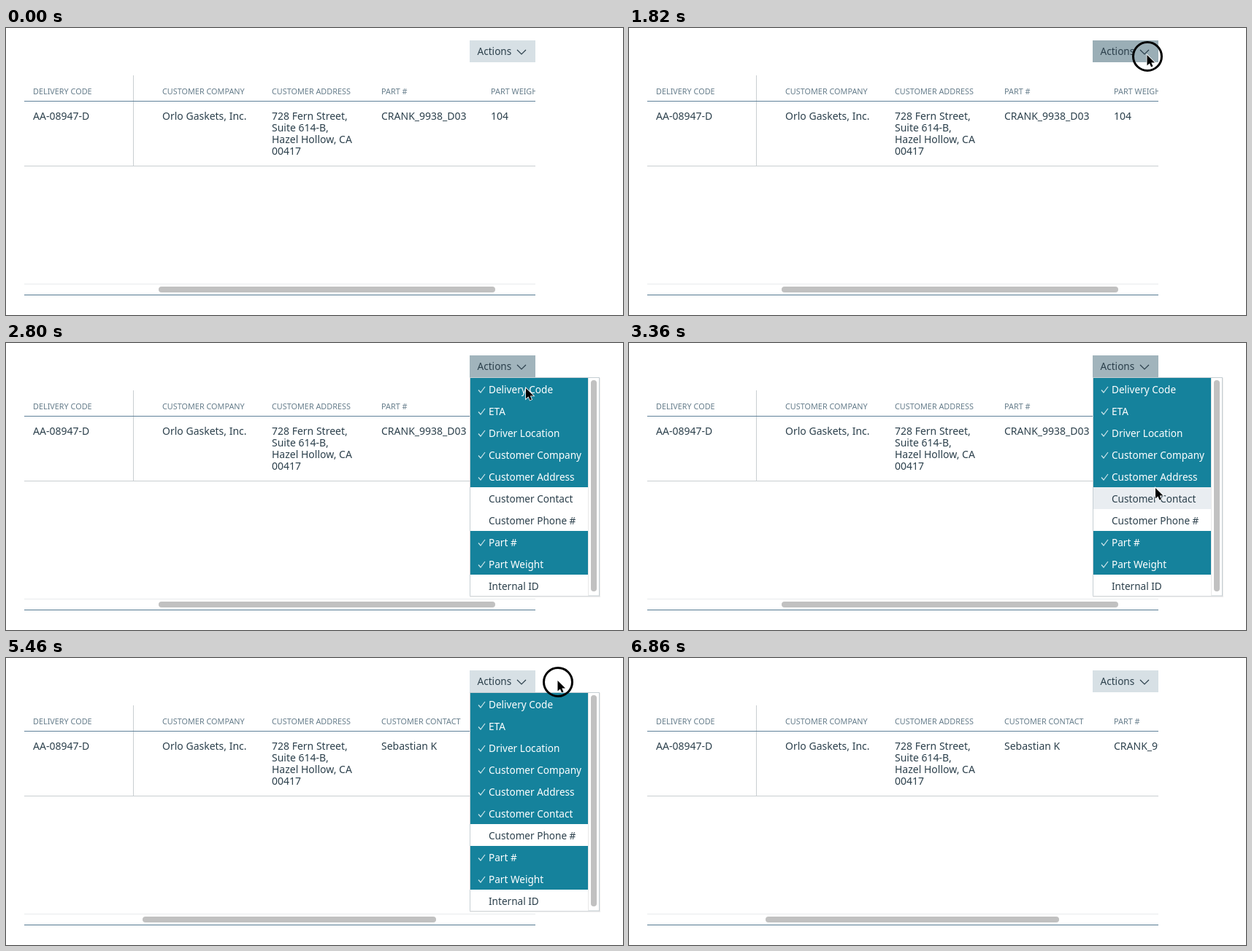
An HTML page for the animation above (7 s loop, 845 by 394 pixels).

```html
<!DOCTYPE html>
<html lang="en">
<head>
<meta charset="utf-8">
<title>Column picker</title>
<style>
  html, body { margin: 0; width: 100%; height: 100%; overflow: hidden; background: #fff; }
  svg { display: block; }
  text { font: 14px "Noto Sans", "Open Sans", sans-serif; fill: #2c404c; white-space: pre; }
  .head { font-size: 10.85px; fill: #677e8c; }
  .item { font-size: 13.6px; }
  .on { fill: #fff; }
  .line { fill: none; stroke: #2c404c; stroke-width: 1.2; }
  .check { fill: none; stroke: #cfe6eb; stroke-width: 1.2; }
  .thumb { fill: #c1c1c1; }
</style>
</head>
<body>
<svg id="stage" width="845" height="394" viewBox="0 0 845 394"></svg>
<script>
const LOOP = 7000, STEP = 140;
const OPEN = 1960, TOGGLE = 3780, CLOSE = 5600;
const CLICKS = [1820, 3640, 5460];
const CONTACT = 5;

// Cursor tip: [time, x, y]
const PATH = [
  [280, 791, 52], [1120, 709.5, 37], [1960, 709.5, 37], [2800, 712, 62],
  [3360, 721, 199], [4200, 721, 199], [4340, 768, 63], [4480, 768, 63],
  [5320, 755.5, 31], [6580, 755.5, 31], [6720, 760, 32], [6860, 760, 32]
];

const ITEMS = ["Delivery Code", "ETA", "Driver Location", "Customer Company", "Customer Address",
  "Customer Contact", "Customer Phone #", "Part #", "Part Weight", "Internal ID"];
const SELECTED = [0, 1, 2, 3, 4, 7, 8];

const CODE = ["DELIVERY CODE", "AA-08947-D"];
const COLUMNS = [
  ["CUSTOMER COMPANY", "Orlo Gaskets, Inc."],
  ["CUSTOMER ADDRESS", "728 Fern Street,", "Suite 614-B,", "Hazel Hollow, CA", "00417"],
  ["PART #", "CRANK_9938_D03"],
  ["PART WEIGHT", "104"]
];
const CONTACT_COLUMN = ["CUSTOMER CONTACT", "Sebastian K"];

const rect = (x, y, w, h, fill, extra = "") =>
  `<rect x="${x}" y="${y}" width="${w}" height="${h}" fill="${fill}" ${extra}/>`;
const text = (x, y, s, cls = "") => `<text x="${x}" y="${y}" class="${cls}">${s}</text>`;
const column = ([head, ...lines], x) =>
  text(x, 91, head, "head") + lines.map((s, i) => text(x, 126 + 16 * i, s)).join("");

function cursorAt(t) {
  const i = PATH.findIndex(key => key[0] > t);
  if (i < 1) return null;
  const [t0, x0, y0] = PATH[i - 1], [t1, x1, y1] = PATH[i];
  const u = (t - t0) / (t1 - t0), k = u * u * (3 - 2 * u);
  return { x: x0 + (x1 - x0) * k, y: y0 + (y1 - y0) * k };
}

function drawTable(withContact) {
  const columns = [...COLUMNS];
  if (withContact) columns.splice(2, 0, CONTACT_COLUMN);
  const [x, w] = withContact ? [187, 402] : [209, 461];
  return `<svg width="725" height="394">` +
    column(CODE, 37) + columns.map((c, i) => column(c, 214 + 150 * i)).join("") + `</svg>` +
    rect(174, 65, 1, 124, "#c9ced1") +
    rect(25, 100, 700, 1, "#5f8199") +
    rect(25, 189, 700, 1, "#c9ced1") +
    rect(25, 351, 700, 1, "#e8ebed") +
    rect(x, 355, w, 8, "#c1c1c1", 'rx="4"') +
    rect(25, 366, 700, 1, "#557a92");
}

function drawButton(fill) {
  return rect(635, 17, 90, 30, fill) + text(645.5, 37, "Actions", "item") +
    `<path class="line" d="M700 30l6 6 6-6"/>`;
}

function drawMenu(selected, hovered) {
  const rows = ITEMS.map((name, i) => {
    const y = 48 + 30 * i, on = selected.includes(i);
    const fill = on ? "#15829c" : i === hovered ? "#e9edf1" : "#fff";
    return rect(636, y, 161, i === 9 ? 29 : 30, fill) +
      (on ? `<path class="check" d="M647 ${y + 16.5}l3 3.5 6-8"/>` : "") +
      text(661, y + 21, name, on ? "item on" : "item");
  });
  return rect(635, 48, 179, 301, "#000", 'opacity=".08"') +
    rect(635.5, 47.5, 177, 299.5, "#fff", 'stroke="#c5ced3"') + rows.join("") +
    rect(797, 48, 1, 299, "#e8e8e8") +
    rect(801, 51, 8, 290, "#c1c1c1", 'rx="4"');
}

function drawCursor({ x, y }, ring) {
  return `<g transform="translate(${x} ${y})">` +
    (ring ? `<circle cx=".5" cy="2" r="19.5" fill="none" stroke="#000" stroke-width="3"/>` : "") +
    `<path d="M0 0V14.6L3.4 11.4 5.6 16.4 8 15.4 5.8 10.5H10.5Z"
      stroke="#fff" stroke-width="1.6" paint-order="stroke"/></g>`;
}

function scene(t) {
  const tip = cursorAt(t);
  const open = t >= OPEN && t < CLOSE, toggled = t >= TOGGLE;
  const overButton = tip && tip.x < 725 && tip.y < 47;
  const focused = open && !toggled;
  const buttonFill = focused ? "#a1b4bc" : overButton ? "#9aaeb6" : "#d7e0e5";
  const hovered = tip ? Math.floor((tip.y - 48) / 30) : -1;
  const selected = toggled ? [...SELECTED, CONTACT] : SELECTED;
  return drawTable(toggled) + drawButton(buttonFill) +
    (open ? drawMenu(selected, hovered) : "") +
    (tip ? drawCursor(tip, CLICKS.includes(t)) : "");
}

const stage = document.getElementById("stage");
const start = performance.now();
let shown = -1;

function tick() {
  const elapsed = Math.max(0, performance.now() - start) % LOOP;
  const t = Math.floor(elapsed / STEP) * STEP;
  if (t !== shown) stage.innerHTML = scene(shown = t);
  requestAnimationFrame(tick);
}
tick();
</script>
</body>
</html>
```
